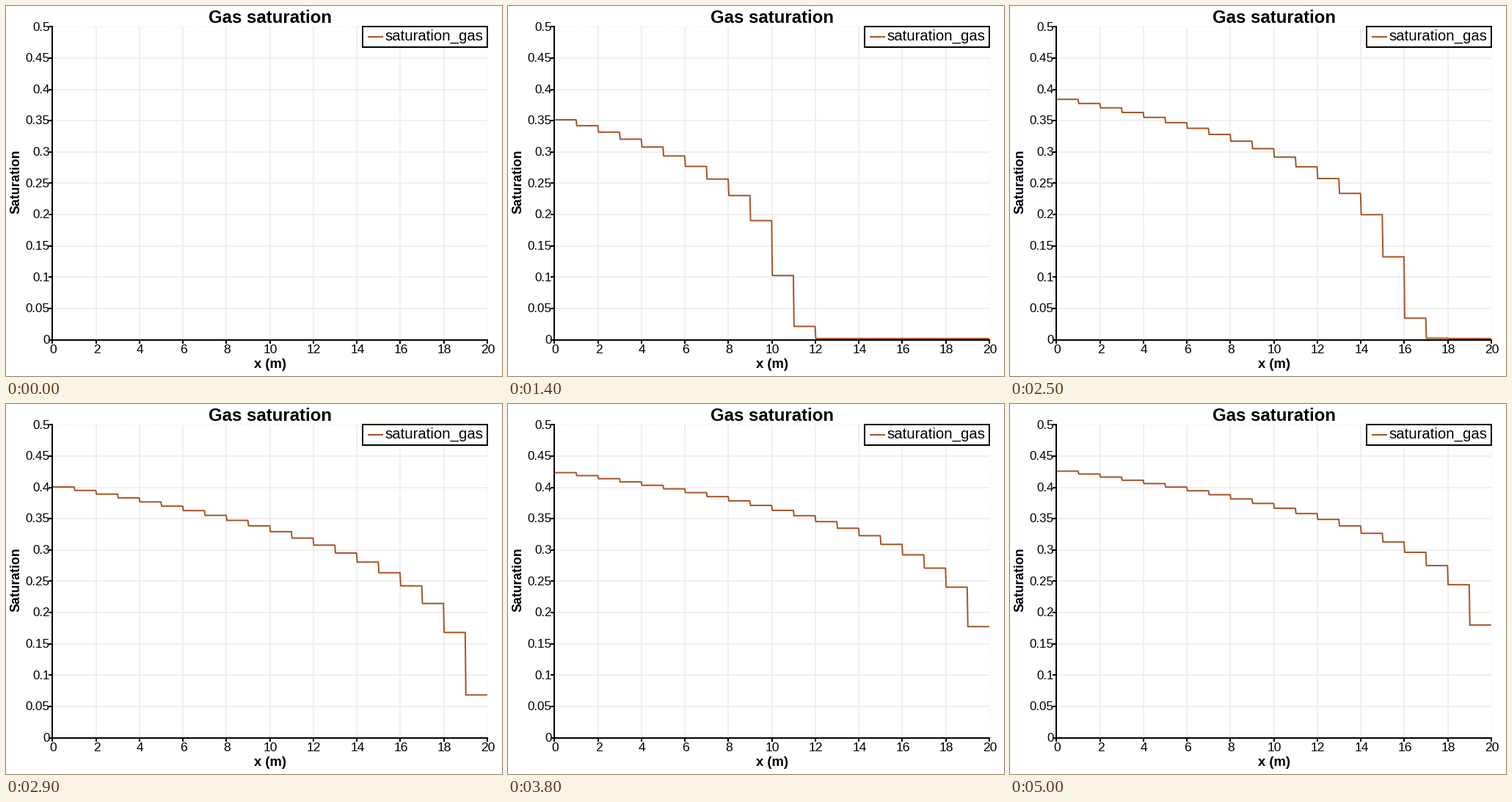
Animation of 676x504 px, one loop 5.7 s. Source, as a matplotlib script:

```python
import numpy as np
import matplotlib.pyplot as plt
from matplotlib.animation import FuncAnimation
from matplotlib.patches import Rectangle

W, H, DPI = 676, 504, 100
LEFT, RIGHT, TOP, BOTTOM = 63.47, 655.77, 28.22, 454.72
CELLS = 20
FRAMES, LAST, ARRIVAL = 57, 50, 30
FLOOR, OFFSET, TOE = 0.002, 0.008, 0.18
BROWN, GRID = "#a65628", "#f0f0f0"
PT = 72 / DPI

plt.rcParams["font.family"] = "Liberation Sans"

centers = np.arange(CELLS) + 0.5
steady = 0.2322 * (19.79 - centers) ** 0.205


def front(t):
    """Distance the gas front has travelled, in metres."""
    return np.interp(t, [1, 7, 14, 25, ARRIVAL], [0.9, 5.86, 10.42, 15.7, 20])


def advancing(t):
    """Fourth-root profile behind the front, with a soft toe ahead of it."""
    reach = front(t)
    behind = TOE * np.logaddexp(0, (reach - centers) / TOE)
    height = 0.2266 * reach ** -0.048
    return np.maximum(FLOOR, height * behind ** 0.25 - OFFSET)


def profile(t):
    if t <= ARRIVAL:
        return advancing(t)
    decay = np.exp(-0.27 * (t - ARRIVAL))
    return steady - (steady - advancing(ARRIVAL)) * decay


def px(x):
    return LEFT + (RIGHT - LEFT) * x / 20


def py(s):
    return BOTTOM - (BOTTOM - TOP) * s / 0.5


fig = plt.figure(figsize=(W / DPI, H / DPI), dpi=DPI, facecolor="white")
ax = fig.add_axes([0, 0, 1, 1])
ax.set_xlim(0, W)
ax.set_ylim(H, 0)
ax.axis("off")


def rule(xs, ys, color="black", width=2, z=3, **kw):
    return ax.plot(xs, ys, color=color, lw=width * PT, zorder=z,
                   solid_capstyle="butt", **kw)[0]


def label(x, y, text, size, **kw):
    ax.text(x, y, text, fontsize=size * PT, zorder=6, **kw)


# Grid, ticks and tick labels
for k in range(11):
    x, y = px(2 * k), py(0.05 * k)
    edge = k == 10
    style = dict(color=GRID, width=1 if edge else 2, z=1,
                 ls=(0, (2, 2)) if edge else "-")
    if k:
        rule([x, x], [TOP, BOTTOM], **style)
        rule([LEFT, RIGHT], [y, y], **style)
    rule([x, x], [BOTTOM, BOTTOM + 5])
    rule([LEFT - 5, LEFT], [y, y])
    label(x + 1, 473, str(2 * k), 17.5, ha="center")
    label(59.5, y + 5.3, f"{0.05 * k:.2g}", 17, ha="right")

rule([LEFT, LEFT], [TOP - 1, BOTTOM + 1])
rule([LEFT - 1, RIGHT + 1], [BOTTOM, BOTTOM])

label(360, 23, "Gas saturation", 24, ha="center", weight="bold")
label(360, 493, "x (m)", 18.5, ha="center", weight="bold")
label(22.5, 239.5, "Saturation", 17.6, rotation=90, ha="right", va="center",
      weight="bold")

# Legend
ax.add_patch(Rectangle((486, 28), 170, 28, fc="white", ec="black",
                       lw=2 * PT, zorder=4))
rule([493, 514], [42, 42], color=BROWN, z=5)
label(516.5, 47, "saturation_gas", 20.4)

curve = rule([], [], color=BROWN, z=2, solid_joinstyle="round")

# Each cell is flat, with a slightly slanted step to the next one.
starts = np.arange(CELLS) + 0.02
ends = np.arange(1, CELLS + 1) - 0.01
starts[0], ends[-1] = 0, CELLS
step_x = px(np.column_stack([starts, ends]).ravel())


def draw(frame):
    t = min(frame, LAST)
    if t == 0:
        curve.set_data([], [])
    else:
        curve.set_data(step_x, py(np.repeat(profile(t), 2)))
    return (curve,)


anim = FuncAnimation(fig, draw, frames=FRAMES, interval=100, repeat=True,
                     repeat_delay=0)
plt.show()
```
